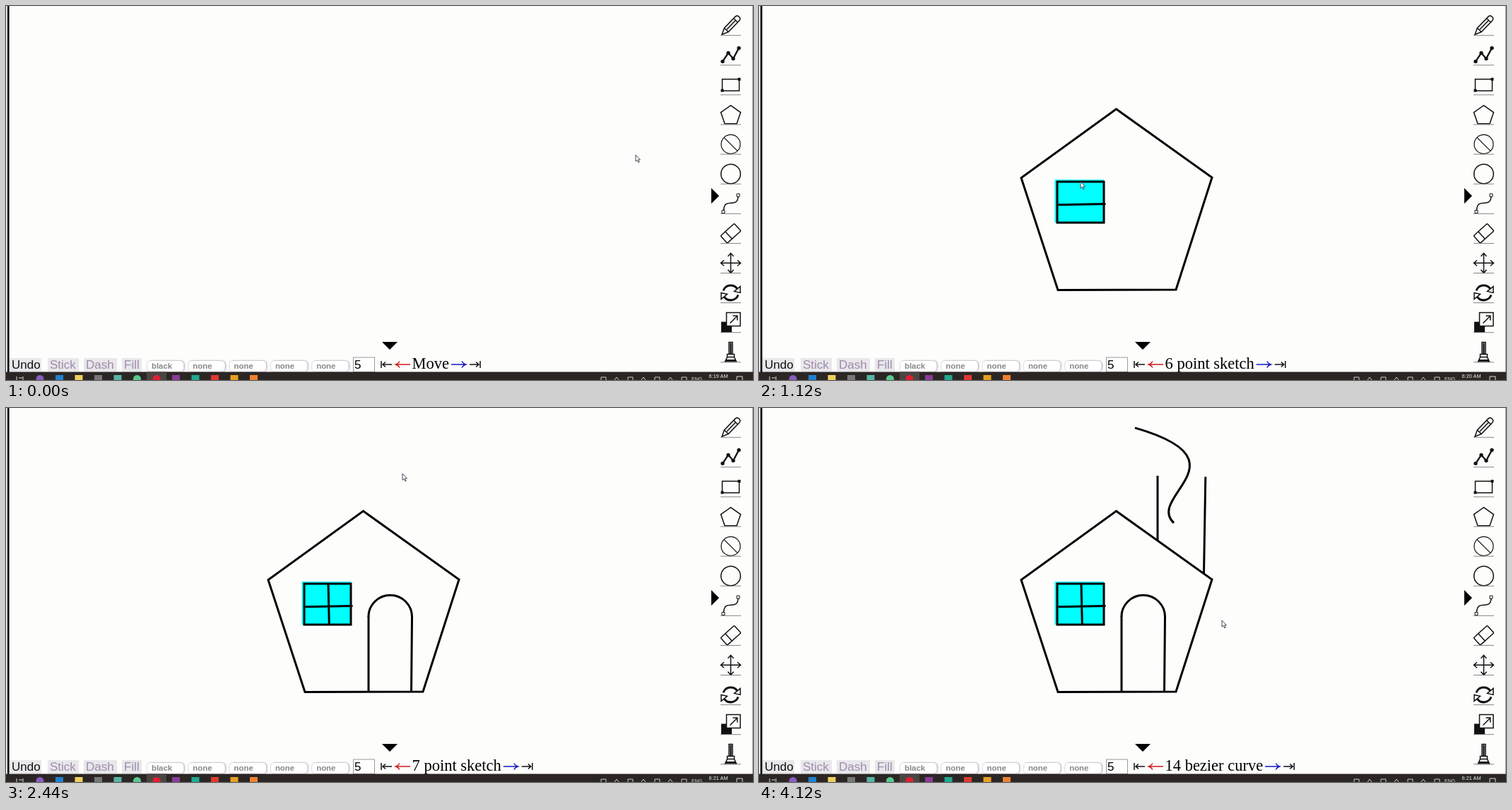
An HTML page for the animation above (4160 ms loop, 1057 px wide and 530 px high).

```html
<!DOCTYPE html>
<html lang="en">
<head>
<meta charset="utf-8">
<title>Drawing a house</title>
<style>
html, body { margin: 0; width: 100%; height: 100%; overflow: hidden; background: #fdfdfc; }
svg { display: block; width: 1057px; height: 530px; }
.ui { font-family: "Liberation Sans", Arial, sans-serif; }
.serif { font-family: "Liberation Serif", "Times New Roman", serif; }
.ink { fill: none; stroke: #000; stroke-width: 3; }
#tools { fill: none; stroke: #111; stroke-width: 1.5; }
#tools .solid { fill: #111; stroke: none; }
</style>
</head>
<body>
<svg id="stage" viewBox="0 0 1057 530">
  <defs>
    <filter id="glow" x="-20%" y="-50%" width="140%" height="200%">
      <feDropShadow dx="0.5" dy="0" stdDeviation="1.3" flood-color="#63487c" flood-opacity=".85"/>
    </filter>
    <path id="arm" d="M0 0V-14M-4 -9.5L0 -14L4 -9.5"/>
    <g id="turn">
      <path stroke-width="3" d="M-10.5 -3A11 10.5 0 0 1 9 -6"/>
      <path class="solid" d="M13.5 -9V0L5 -2Z"/>
    </g>
  </defs>
  <rect width="1057" height="530" fill="#fdfdfc"/>
  <path id="house" class="ink"/>
  <rect id="pane" fill="#0ff"/>
  <rect id="frame" class="ink"/>
  <path id="bar" class="ink"/>
  <path id="post" class="ink"/>
  <circle id="arch" class="ink"/>
  <rect id="rub" x="509" y="296" height="34" fill="#fdfdfc"/>
  <path id="jambs" class="ink"/>
  <path id="chimney" class="ink"/>
  <path id="smoke" class="ink"/>
  <rect width="1.2" height="519" fill="#c9d4d4"/>
  <rect x="2" width="2.6" height="519"/>
  <rect x="1056" width="1" height="519" fill="#9a9a9a"/>

  <g id="tools">
    <g><g transform="rotate(44)"><path d="M0 18L-4 9V-13Q-4 -17 0 -17T4 -13V9ZM-4 9H4M-4 -10H4M0 8V-10"/></g></g>
    <g>
      <path stroke-width="2.3" d="M-11.5 9L-3.5 -3L3.5 5L11.5 -10"/>
      <path stroke-width="5.4" stroke-linecap="round" d="M-11.5 9h.01m8 -12h.01m7 8h.01m8 -15h.01"/>
    </g>
    <g><rect x="-12" y="-8" width="24" height="16.5"/><path class="solid" d="M-14 6h4v4h-4ZM10 -10h4v4h-4Z"/></g>
    <g><path d="M0 -13L14 -3L8.5 13H-8.5L-14 -3Z"/></g>
    <g stroke-width="1.2"><circle r="13.5"/><path d="M-9.5 -9.5L9.5 9.5"/></g>
    <g><circle r="13.8"/></g>
    <g><path d="M-10 9C-9 -10 9 8 10.5 -10"/><path stroke-width="1" d="M-12.5 9.5h4v4h-4ZM8.5 -14h4v4h-4Z"/></g>
    <g><g transform="rotate(-42)"><rect x="-13" y="-7" width="26" height="14" rx="1.5"/><path d="M-4 -7V7"/></g></g>
    <g>
      <use href="#arm"/><use href="#arm" transform="rotate(90)"/>
      <use href="#arm" transform="rotate(180)"/><use href="#arm" transform="rotate(270)"/>
    </g>
    <g><use href="#turn"/><use href="#turn" transform="rotate(180)"/></g>
    <g>
      <rect class="solid" x="-13.5" y="-1" width="15" height="15"/>
      <rect x="-6" y="-14" width="19.5" height="19" fill="#fdfdfc"/>
      <path d="M-1 1L9 -9M3 -9.5H9.3V-3"/>
    </g>
    <g><path d="M-2.5 3V-14H2.5V3M-5 3H5V7H-5ZM-5 7L-8 13.5H8L5 7"/><path stroke-width="2.4" d="M0 -13V3M-7 11.5H7"/></g>
  </g>

  <path d="M998 258V280L1009 269ZM532 476H554L543 487Z"/>
  <g id="controls" class="ui"></g>
  <rect x="491.5" y="498" width="30" height="20.5" fill="#fff" stroke="#999"/>
  <text class="ui" x="493" y="514" font-size="17">5</text>
  <g fill="none" stroke-width="1.5">
    <path stroke="#111" d="M531 503v10M546 508h-13m4 -3.5l-4 3.5l4 3.5"/>
    <path id="prev" stroke="#d01818" d="M572 508h-20m5 -4.5q-2 3.5 -5.5 4.5q3.5 1 5.5 4.5"/>
  </g>
  <text id="label" class="serif" x="574.5" y="514" font-size="22.5"></text>
  <g id="next" fill="none" stroke-width="1.5">
    <path stroke="#1414c8" d="M3 508h20m-5 -4.5q2 3.5 5.5 4.5q-3.5 1 -5.5 4.5"/>
    <path stroke="#111" d="M44 503v10M29 508h13m-4 -3.5l4 3.5l-4 3.5"/>
  </g>
  <g id="taskbar" class="ui">
    <rect y="518.5" width="1057" height="11.5" fill="#2b2624"/>
    <rect x="199" y="518.5" width="28" height="11.5" fill="#4a4543"/>
    <path d="M15 525v5m3 -3h5m1 -2v5M1034 530v-5h8v5" stroke="#ddd" fill="none"/>
    <text x="970" y="531" font-size="7" fill="#ddd">ENG</text>
  </g>
  <text id="clock" class="ui" x="994.5" y="527" font-size="7.4" fill="#eee"></text>
  <g id="menu" class="ui" font-size="11.6"></g>
  <g id="tip" class="serif" font-size="9.8" fill="#fff" text-anchor="middle">
    <path d="M602 483h8l-4 4Z" fill="#555"/>
    <rect x="572" y="440" width="67.5" height="43" rx="4" fill="#555"/>
    <text x="606" y="453">Select Drawn</text>
    <text x="606" y="465.5">Element to</text>
    <text x="606" y="478">Move</text>
  </g>
  <path id="cursor" d="M0 0V9.2L2.2 7.3L3.8 10.8L5.2 10.1L3.7 6.8H6.4Z" fill="#fff" stroke="#333a48" stroke-width=".9"/>
</svg>
<script>
const NS = "http://www.w3.org/2000/svg";
const STEP = 40, STEPS = 104;
const $ = id => document.getElementById(id);

function set(el, attrs) {
  for (const k in attrs) el.setAttribute(k, attrs[k]);
  return el;
}
function add(parent, tag, attrs, text) {
  const el = set(document.createElementNS(NS, tag), attrs);
  if (text) el.textContent = text;
  parent.append(el);
  return el;
}
const show = (id, on) => $(id).setAttribute("visibility", on ? "visible" : "hidden");
const mix = (a, b, k) => a + (b - a) * k;
const toolY = i => 27.5 + 42.1 * i;

[...$("tools").children].forEach((icon, i) => {
  icon.setAttribute("transform", `translate(1025.5 ${toolY(i)})`);
  add($("tools"), "path", { d: `M1011 ${toolY(i) + 14.2}h29`, stroke: "#777", "stroke-width": 0.9 });
});

// Bottom controls
function button(name, x, width, fill) {
  add($("controls"), "rect", { x, y: 499, width, height: 19, fill: "#e8e7ea" });
  add($("controls"), "text", { x: x + 3, y: 514, "font-size": 17, fill }, name);
}
button("Undo", 5, 45, "#111");
button("Stick", 59, 44, "#a08bad");
button("Dash", 110, 47, "#a08bad");
button("Fill", 164, 28, "#a08bad");

const picks = ["black", "none", "none", "none", "none"].map((name, i) => {
  const x = 200 + 58.3 * i;
  return {
    box: add($("controls"), "rect", { x, y: 503, width: 51.5, height: 15, rx: 5, fill: "#fff", filter: "url(#glow)" }),
    text: add($("controls"), "text", { x: x + 6, y: 514, "font-size": 11.4, "font-weight": "bold", fill: "#888" }, name)
  };
});

// Taskbar marks
"#8a5cc0 #2080d0 #f0cf60 #777 #58b5a4 #5ac890 #e02030 #8a3c98 #20a890 #e03830 #e8a020 #f08030".split(" ").forEach((fill, i) => {
  const round = i === 0 || i === 5 || i === 6;
  add($("taskbar"), "rect", { x: 42.5 + 27.5 * i, y: 523, width: 11, height: round ? 11 : 8, rx: round ? 5.5 : 0, fill });
});
for (let i = 0; i < 7; i++) {
  const d = `M${842 + 19 * i} 530` + (i % 2 ? "l3 -4l3 4" : "v-4h7v4");
  add($("taskbar"), "path", { d, stroke: "#ccc", fill: "none" });
}

// Colour list
const colors = "black gray red magenta blue cyan lightblue green lightgreen orange yellow".split(" ");
const rows = colors.map((c, i) => {
  const y = 305 + 17.95 * i;
  return {
    box: add($("menu"), "rect", { x: 200.5, y, width: 56.5, height: 18.1 }),
    text: add($("menu"), "text", { x: 206.5, y: y + 13 }, c)
  };
});
add($("menu"), "rect", { x: 200.5, y: 304.8, width: 56.5, height: 197.5, fill: "none", stroke: "#4a8ad0", "stroke-width": 0.7 });

// Drags on the canvas: first and last step, from, to
const drag = (a, b, x1, y1, x2, y2) => ({ a, b, x1, y1, x2, y2 });
const house = drag(4, 6, 506, 288, 590, 402);
const pane = drag(12, 13, 418.5, 246, 488, 307);
const frame = drag(16, 18, 422, 249, 488, 307);
const bar = drag(23, 26, 423.5, 281.8, 490.5, 280.6);
const post = drag(28, 31, 458, 252, 459.3, 311);
const arch = drag(36, 38, 543.7, 296, 574.5, 296);
const rub = drag(41, 44, 509, 312, 578, 312);
const jambL = drag(46, 47, 513, 295, 513, 402);
const jambR = drag(48, 50, 574.5, 295, 573.5, 402);
const slide = drag(56, 58, 461, 283, 459, 279.5);
const stackL = drag(61, 63, 564, 96, 564, 187);
const stackR = drag(64, 66, 631.8, 97.5, 629.5, 234);
const smoke = drag(68, 70, 519, 35, 600, 156);
const spin = drag(85, 93, 635, 99, 633, 114);
const drags = [house, pane, frame, bar, post, arch, rub, jambL, jambR, slide, stackL, stackR, smoke, spin];

// Pointer stops: step, x, y
const tool = (step, i) => [step, 1024, toolY(i)];
const picker = step => [step, 222, 508];
const fillButton = step => [step, 178, 507];
const stops = [
  [0, 891, 211], tool(2, 3), picker(7), [8, 233, 418], [9, 228, 402], fillButton(10), tool(11, 2),
  [14, 222, 314], fillButton(15), tool(21, 1), tool(33, 5), tool(40, 7), tool(45, 1),
  [51, 563, 509], [52, 561, 509], [54, 562, 508], tool(55, 8), tool(60, 1), tool(67, 6),
  [71, 640, 60], [72, 560, 125], [73, 1052, 371], [75, 1052, 371], tool(77, 9), [81, 632, 96], [96, 655, 301],
  ...drags.flatMap(d => [[d.a, d.x1 - 3, d.y1 - 3], [d.b, d.x2 - 3, d.y2 - 3]])
].sort((p, q) => p[0] - q[0]);

const labels = [
  [0, "Move"], [6, "1 polygon"], [13, "2 rectangle"], [18, "3 rectangle"], [26, "6 point sketch"],
  [31, "7 point sketch"], [38, "8 circle"], [44, "9 erase"], [47, "10 point sketch"], [50, "11 point sketch"],
  [51, "10 point sketch"], [52, "9 erase"], [53, "8 circle"], [54, "7 point sketch"],
  [63, "12 point sketch"], [66, "13 point sketch"], [70, "14 bezier curve"]
];

function pointer(f) {
  const i = stops.findLastIndex(s => s[0] <= f);
  const p = stops[i], q = stops[i + 1] || p;
  const k = p === q ? 0 : (f - p[0]) / (q[0] - p[0]);
  return [mix(p[1], q[1], k), mix(p[2], q[2], k)];
}

function render(ms) {
  const f = Math.floor(ms / STEP) % STEPS;
  const part = ({ a, b }) => Math.max(0, Math.min(1, (f - a) / (b - a)));
  const line = d => {
    const k = part(d);
    return k ? `M${d.x1} ${d.y1}L${mix(d.x1, d.x2, k)} ${mix(d.y1, d.y2, k)}` : "";
  };
  const box = (id, d) => {
    const k = part(d);
    show(id, k);
    set($(id), { x: d.x1, y: d.y1, width: (d.x2 - d.x1) * k, height: (d.y2 - d.y1) * k });
  };

  // Drawing
  const grow = part(house);
  const corners = [[505.5, 146], [641, 243], [590, 402], [423, 402.5], [371, 243.5]];
  show("house", grow);
  $("house").setAttribute("d", "M" + corners.map(([x, y]) => mix(506, x, grow) + " " + mix(288, y, grow)).join("L") + "Z");
  box("pane", pane);
  box("frame", frame);
  $("bar").setAttribute("d", line(bar));
  const shift = part(slide);
  set($("post"), { d: line(post), transform: `translate(${-2 * shift} ${-3.5 * shift})` });
  show("arch", part(arch));
  set($("arch"), { cx: arch.x1, cy: arch.y1, r: 30.8 * part(arch) });
  $("rub").setAttribute("width", 69 * part(rub));
  $("jambs").setAttribute("d", line(jambL) + line(jambR));
  $("chimney").setAttribute("d", line(stackL) + line(stackR));

  const reach = part(smoke), b1 = part({ a: 70, b: 71 }), b2 = part({ a: 71, b: 72 });
  const ex = mix(519, 600, reach), ey = mix(35, 156, reach);
  show("smoke", reach);
  set($("smoke"), {
    d: `M519 35C${mix(519, 686, b1)} ${mix(35, 48, b1)} ${mix(ex, 553, b2)} ${mix(ey, 128, b2)} ${ex} ${ey}`,
    transform: `rotate(${11.6 * part(spin)} 559.5 95.5)`
  });

  // Interface
  const hover = { 7: 10, 8: 6, 9: 5, 14: 0 }[f];
  show("menu", hover !== undefined);
  rows.forEach(({ box, text }, i) => {
    const on = i === hover;
    box.setAttribute("fill", on ? "#1e90ff" : colors[i]);
    text.setAttribute("fill", on ? "#fff" : i < 5 && i % 2 === 0 ? "#b5b0b0" : "#8c8c8c");
  });
  picks[0].text.textContent = f > 9 && f < 14 ? "cyan" : "black";
  picks[0].box.setAttribute("stroke", f > 6 && f < 19 ? "#5a9ae0" : "none");

  $("label").textContent = labels.findLast(l => l[0] <= f)[1];
  $("next").setAttribute("transform", `translate(${574.5 + $("label").getComputedTextLength()} 0)`);
  $("clock").textContent = f < 12 ? "6:19 AM" : f < 38 ? "6:20 AM" : "6:21 AM";
  const picking = f > 50 && f < 55;
  show("tip", picking);
  $("prev").setAttribute("opacity", picking ? 0.5 : 1);
  $("cursor").setAttribute("transform", `translate(${pointer(f)})`);
}

const start = performance.now();
function tick() {
  render(performance.now() - start);
  requestAnimationFrame(tick);
}
tick();
</script>
</body>
</html>
```
